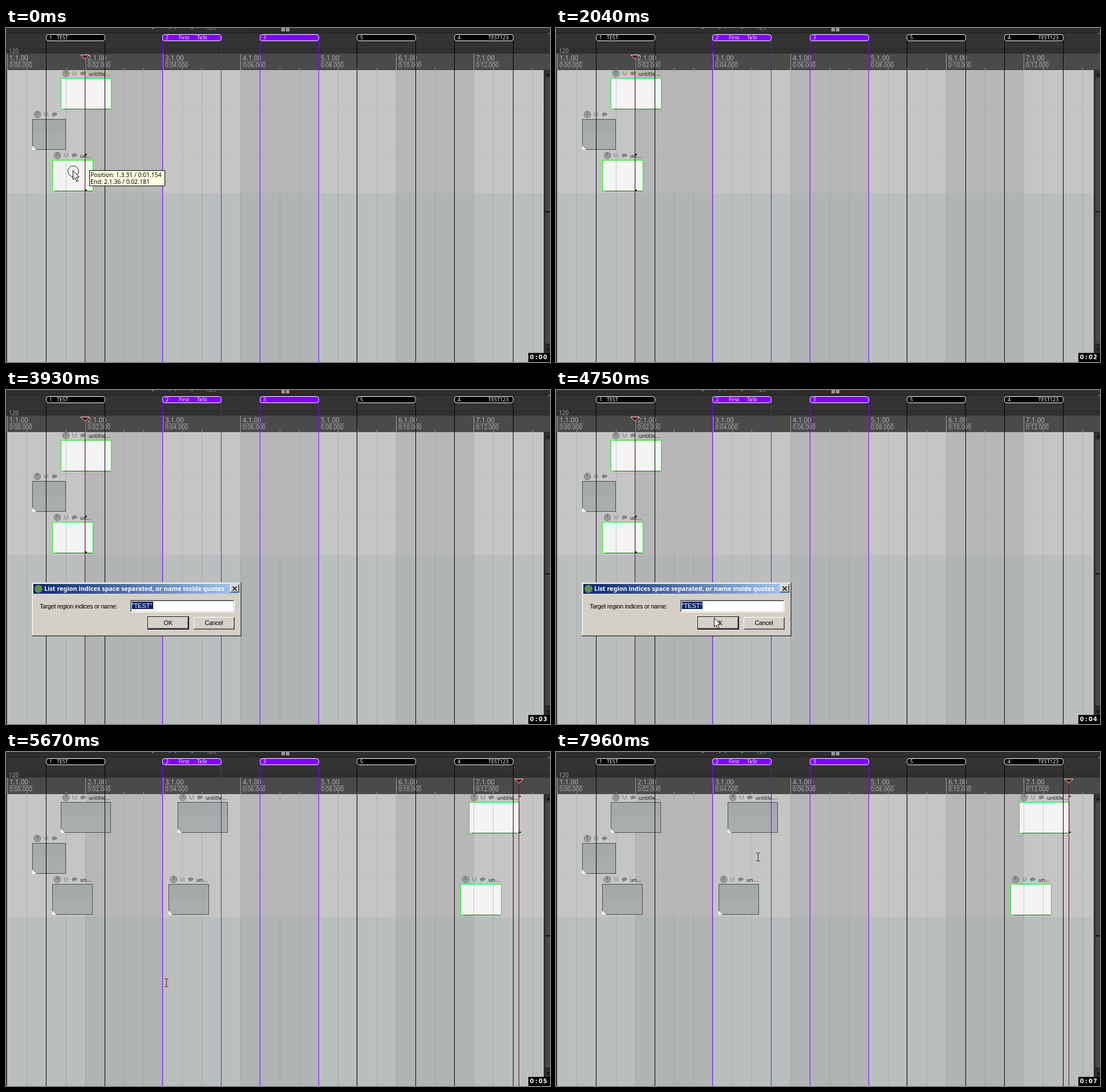
Animation of 954x587 px, one loop 8000 ms. Source, as an HTML page with a canvas:

```html
<!DOCTYPE html>
<html lang="en">
<head>
<meta charset="utf-8">
<title>Region copy</title>
<style>
  html, body { margin: 0; width: 100%; height: 100%; overflow: hidden; background: #333; }
  canvas { display: block; width: 954px; height: 587px; }
</style>
</head>
<body>
<canvas id="stage" width="954" height="587"></canvas>
<script>
const ctx = document.getElementById('stage').getContext('2d');
const LOOP = 8000;
const UI = '"Noto Sans", sans-serif';
const WIDE = '"DejaVu Sans", sans-serif';
const CLASSIC = '"Liberation Sans", Arial, sans-serif';
const BAR = 136.35, BEAT = BAR / 4, LEFT = 2.3;
const OPEN = 2850, PRESS = 5550, DONE = 5670;
const PURPLE = '#8000ff';

const secondTicks = [950, 2040, 2970, 4050, 5020, 6230, 7200];

// time, shape, x, y (arrow tip or I-beam centre)
const pointer = [
  [0, 'arrow', 117, 250], [300, 'arrow', 113, 263], [450, 'arrow', 141, 273],
  [700, 'arrow', 117, 249], [850, 'none', 0, 0],
  [4150, 'arrow', 8, 253], [4300, 'arrow', 7, 251], [4450, 'arrow', 224, 353],
  [4600, 'beam', 251, 383], [4750, 'arrow', 277, 400], [4900, 'arrow', 279, 404],
  [5670, 'beam', 281, 405], [6330, 'beam', 280, 404], [6480, 'beam', 346, 364],
  [6630, 'beam', 393, 352], [6780, 'beam', 400, 335], [6900, 'beam', 407, 318],
  [7050, 'beam', 466, 253], [7310, 'beam', 430, 205], [7420, 'beam', 415, 187],
  [7570, 'beam', 390, 187], [7690, 'beam', 370, 186], [7840, 'beam', 358, 185],
  [7960, 'beam', 354, 184]
];

const regions = [
  { x: 70, color: '#000', labels: [['1', 76], ['TEST', 89]] },
  { x: 274, color: PURPLE, labels: [['2', 280], ['First', 303], ['TeSt', 335]] },
  { x: 445, color: PURPLE, labels: [['3', 451]] },
  { x: 615, color: '#000', labels: [['5', 621]] },
  { x: 786, color: '#000', labels: [['4', 792], ['TEST123', 846]] }
];

function box(x, y, w, h, color) {
  ctx.fillStyle = color;
  ctx.fillRect(x, y, w, h);
}

function frame(x, y, w, h, color) {
  ctx.strokeStyle = color;
  ctx.lineWidth = 1;
  ctx.strokeRect(x + .5, y + .5, w - 1, h - 1);
}

function text(s, x, y, size, color, font = UI, weight = 400, spacing = 0) {
  ctx.font = `${weight} ${size}px ${font}`;
  ctx.letterSpacing = spacing + 'px';
  ctx.fillStyle = color;
  ctx.fillText(s, x, y);
}

function shape(points, fill, stroke, dx = 0, dy = 0) {
  ctx.beginPath();
  points.forEach(([x, y]) => ctx.lineTo(x + dx, y + dy));
  ctx.closePath();
  ctx.fillStyle = fill;
  ctx.fill();
  if (stroke) {
    ctx.strokeStyle = stroke;
    ctx.lineWidth = 1;
    ctx.stroke();
  }
}

function dots(x, y, h, color) {
  for (let i = 0; i < h; i += 2) box(x, y + i, 1, 1, color);
}

function circle(x, y, r, fill, stroke) {
  ctx.beginPath();
  ctx.arc(x, y, r, 0, 7);
  if (fill) { ctx.fillStyle = fill; ctx.fill(); }
  if (stroke) { ctx.strokeStyle = stroke; ctx.lineWidth = 1; ctx.stroke(); }
}

const beatX = i => Math.round(LEFT + i * BEAT);

function drawHeader() {
  box(0, 0, 954, 9, '#2e2e2e');
  box(384, 0, 1, 8, '#1f1f1f');
  box(422, 0, 135, 8, '#2b2b2b');
  text('120', 351, 3, 10, '#8a8a8a');
  [256, 286, 296, 325].forEach((x, i) => box(x, 0, i % 3 ? 2 : 3, 2, '#777'));
  box(483, 0, 14, 6, '#999');
  box(489, 0, 2, 6, '#333');
  box(0, 8, 954, 1, '#1c1c1c');
  box(0, 9, 954, 27, '#333');
  box(951, 9, 3, 1, '#ccc');
  box(0, 36, 954, 9, '#303030');
  box(0, 36, 954, 1, '#2a2a2a');
  text('120', 5, 44, 10, '#a2a2a2');
  box(0, 45, 954, 29, '#4a4a4a');
  for (let i = 0; beatX(i) < 943; i++) {
    const x = beatX(i);
    if (i % 4) { box(x, 70, 1, 4, '#999'); continue; }
    box(x, 45, 1, 29, '#a0a0a0');
    text(`${i / 4 + 1}.1.00`, x + 4, 57, 11.7, '#b2b2b2');
    box(x + 4, 59, 41, 1, '#909090');
    text(`0:${String(i / 2).padStart(2, '0')}.000`, x + 4, 69, 10.1, '#b2b2b2');
  }
}

function drawArrange() {
  for (let bar = 0; bar < 7; bar++) {
    const x = beatX(bar * 4), w = Math.min(beatX(bar * 4 + 4), 943) - x;
    box(x, 74, w, 216, bar % 2 ? '#b6b7b6' : '#c4c5c4');
    box(x, 290, w, 297, bar % 2 ? '#b0b4b5' : '#bbbebf');
  }
  box(0, 74, 2, 513, '#333');
  for (let i = 1; beatX(i) < 943; i++) {
    dots(beatX(i), 74, 216, '#9d9e9d');
    box(beatX(i), 290, 1, 297, 'rgba(130,135,136,.36)');
  }
  for (const y of [146, 218]) for (let x = 3; x < 943; x += 4) box(x, y, 1, 1, 'rgba(120,120,120,.3)');
}

function drawScrollbar() {
  box(943, 74, 11, 513, '#2c2c2c');
  box(946, 76, 8, 479, '#484848');
  box(946, 76, 8, 12, '#333');
  shape([[948, 84], [951, 79], [954, 84]], '#111');
  box(946, 322, 8, 2, '#111');
  box(946, 555, 8, 1, '#111');
  shape([[948, 563], [954, 563], [951, 568]], '#111');
}

function drawItem(x, y, w, label, selected) {
  const h = 54, iconY = y - 8;
  circle(x + 9, iconY, 5.8, '#999b9a', '#777');
  box(x + 8.5, iconY - 5, 1, 6, '#555');
  box(x + 18, iconY - 5, 12, 11, 'rgba(215,215,215,.35)');
  text('M', x + 19.5, iconY + 4, 10.5, '#858585', UI, 500);
  box(x + 32, iconY - 5, 13, 11, 'rgba(215,215,215,.35)');
  ctx.beginPath();
  ctx.ellipse(x + 39, iconY - .5, 5, 3.2, 0, 0, 7);
  ctx.fillStyle = '#858585';
  ctx.fill();
  shape([[x + 36, iconY + 1], [x + 39, iconY + 2], [x + 35.5, iconY + 5]], '#858585');
  text(label, x + 49, y - 4, 9, '#111', WIDE);

  if (selected) {
    box(x, y, w + 1, h + 1, '#f4f4f4');
    for (let i = 1; i < 28; i++) {
      const gx = beatX(i);
      if (gx > x + 1 && gx < x + w - 1) dots(gx, y + 1, h - 1, '#999');
    }
    frame(x, y, w + 1, h + 1, '#0f0');
    box(x + 5, y + h, w - 6, 1, '#18641c');
    shape([[x + 1, y + h - 6], [x + 7, y + h], [x + 1, y + h]], '#fff');
  } else {
    box(x, y, w, h, '#a4a9aa');
    box(x, y + 25, w, h - 25, '#a8adad');
    frame(x, y, w, h, '#4c4f4f');
    shape([[x, y + h - 7], [x + 7, y + h], [x, y + h]], '#f6f6f6');
  }
}

function drawItems(copied) {
  drawItem(96, 88, 88, 'untitle...', !copied);
  drawItem(46, 160, 59, '', false);
  drawItem(81, 232, 71, 'un...', !copied);
  if (!copied) return;
  drawItem(301, 88, 88, 'untitle...', false);
  drawItem(285, 232, 71, 'un...', false);
  drawItem(812, 88, 88, 'untitle...', true);
  drawItem(797, 232, 71, 'un...', true);
}

function drawRegions() {
  for (const { x, color, labels } of regions) {
    box(x, 20, 1, 567, color);
    box(x + 103, 20, 1, 567, color);
    ctx.beginPath();
    ctx.roundRect(x + .5, 11.5, 103, 11, 4);
    ctx.fillStyle = color;
    ctx.fill();
    ctx.strokeStyle = '#fff';
    ctx.lineWidth = 1;
    ctx.stroke();
    labels.forEach(([s, labelX]) => text(s, labelX, 20, 9, '#fff'));
  }
}

function drawPlayhead(copied) {
  const x = copied ? 899 : 138, top = copied ? 77 : 221;
  box(x, 55, 1, 532, '#5a1418');
  shape([[-7, 47.5], [8, 47.5], [.5, 55]], '#5a1010', '#f0e8e8', x, 0);
  box(x + 1, top, 3, 2, copied ? '#5a1418' : '#111');
  box(x + 1, top + 63, 3, 2, '#111');
}

function drawTooltip() {
  box(146, 250, 133, 28, '#ffffe1');
  frame(146, 250, 133, 28, '#000');
  text('Position: 1.3.31 / 0:01.154', 148, 262, 10.4, '#000');
  text('End: 2.1.36 / 0:02.181', 148, 274, 10.4, '#000');
}

function bevel(x, y, w, h, light, dark) {
  box(x, y, w, 1, light);
  box(x, y, 1, h, light);
  box(x, y + h - 1, w, 1, dark);
  box(x + w - 1, y, 1, h, dark);
}

function button(x, y, w, h) {
  box(x, y, w, h, '#d4d0c8');
  bevel(x, y, w, h, '#fff', '#404040');
  bevel(x + 1, y + 1, w - 2, h - 2, '#d4d0c8', '#808080');
}

function drawDialog(t) {
  const pressed = t >= PRESS;
  box(45, 338, 368, 95, '#d4d0c8');
  bevel(45, 338, 368, 95, '#d4d0c8', '#404040');
  bevel(46, 339, 366, 93, '#fff', '#808080');
  const bar = ctx.createLinearGradient(48, 0, 410, 0);
  bar.addColorStop(0, '#0a246a');
  bar.addColorStop(1, '#a6caf0');
  box(48, 341, 362, 17, bar);
  circle(57, 349.5, 7, '#5f8f4a');
  text('List region indices space separated, or name inside quotes', 67, 353, 10.87, '#fff', UI, 700);
  button(393, 342, 16, 14);
  ctx.strokeStyle = '#000';
  ctx.lineWidth = 1.6;
  ctx.beginPath();
  ctx.moveTo(397.5, 345.5); ctx.lineTo(404.5, 352.5);
  ctx.moveTo(404.5, 345.5); ctx.lineTo(397.5, 352.5);
  ctx.stroke();

  text('Target region indices or name:', 59, 384, 11, '#000', CLASSIC, 400, -.4);
  box(218, 369, 183, 22, '#fff');
  bevel(218, 369, 183, 22, '#808080', '#fff');
  bevel(219, 370, 181, 20, '#404040', '#d4d0c8');
  if (!pressed) box(221, 372, 36, 13, '#0a246a');
  text('"TEST"', 220.5, 383, 11, pressed ? '#000' : '#fff', CLASSIC);
  const caret = t < 3370 || (t >= 3930 && t < 4600) || (t >= 5120 && t < PRESS);
  if (caret) box(257, 372, 1, 13, '#000');

  button(249, 399, 71, 21);
  if (pressed) {
    frame(249, 400, 70, 20, '#808080');
    ctx.setLineDash([1, 1]);
    frame(252, 403, 65, 15, '#000');
    ctx.setLineDash([]);
  }
  frame(248, 398, 73, 23, '#000');
  const shift = pressed ? 1 : 0;
  text('OK', 276.5 + shift, 413 + shift, 11, '#000', CLASSIC);
  button(329, 399, 72, 22);
  text('Cancel', 348.5, 413, 11, '#000', CLASSIC, 400, -.4);
}

function drawPointer(t) {
  const [, kind, x, y] = pointer.findLast(p => p[0] <= t);
  const clicking = t < 150 || (t >= PRESS && t < DONE);
  if (clicking) circle(x + 1, y + 2, 9.5, null, '#222');
  if (kind === 'arrow') {
    shape([[.5, .5], [.5, 16.5], [4, 13.2], [7, 20], [9.5, 19], [6.6, 12.2], [11.3, 12]], '#fff', '#000', x, y);
  } else if (kind === 'beam') {
    box(x, y - 6, 1, 13, '#222');
    for (const dy of [-7, 7]) {
      box(x - 3, y + dy, 3, 1, '#222');
      box(x + 1, y + dy, 3, 1, '#222');
    }
  }
}

function drawClock(t) {
  const seconds = secondTicks.filter(s => s <= t).length;
  box(916, 571, 38, 16, '#000');
  [['0', 918.7], [':', 928], ['0', 934], [seconds, 942]]
    .forEach(([s, x]) => text(s, x, 582, 10, '#fff', WIDE, 700));
}

const start = performance.now();

function draw() {
  const t = (performance.now() - start) % LOOP;
  const copied = t >= DONE;
  drawHeader();
  drawArrange();
  drawItems(copied);
  drawRegions();
  drawPlayhead(copied);
  drawScrollbar();
  if (t < 150) drawTooltip();
  if (t >= OPEN && t < DONE) drawDialog(t);
  drawPointer(t);
  drawClock(t);
  requestAnimationFrame(draw);
}
draw();
</script>
</body>
</html>
```
